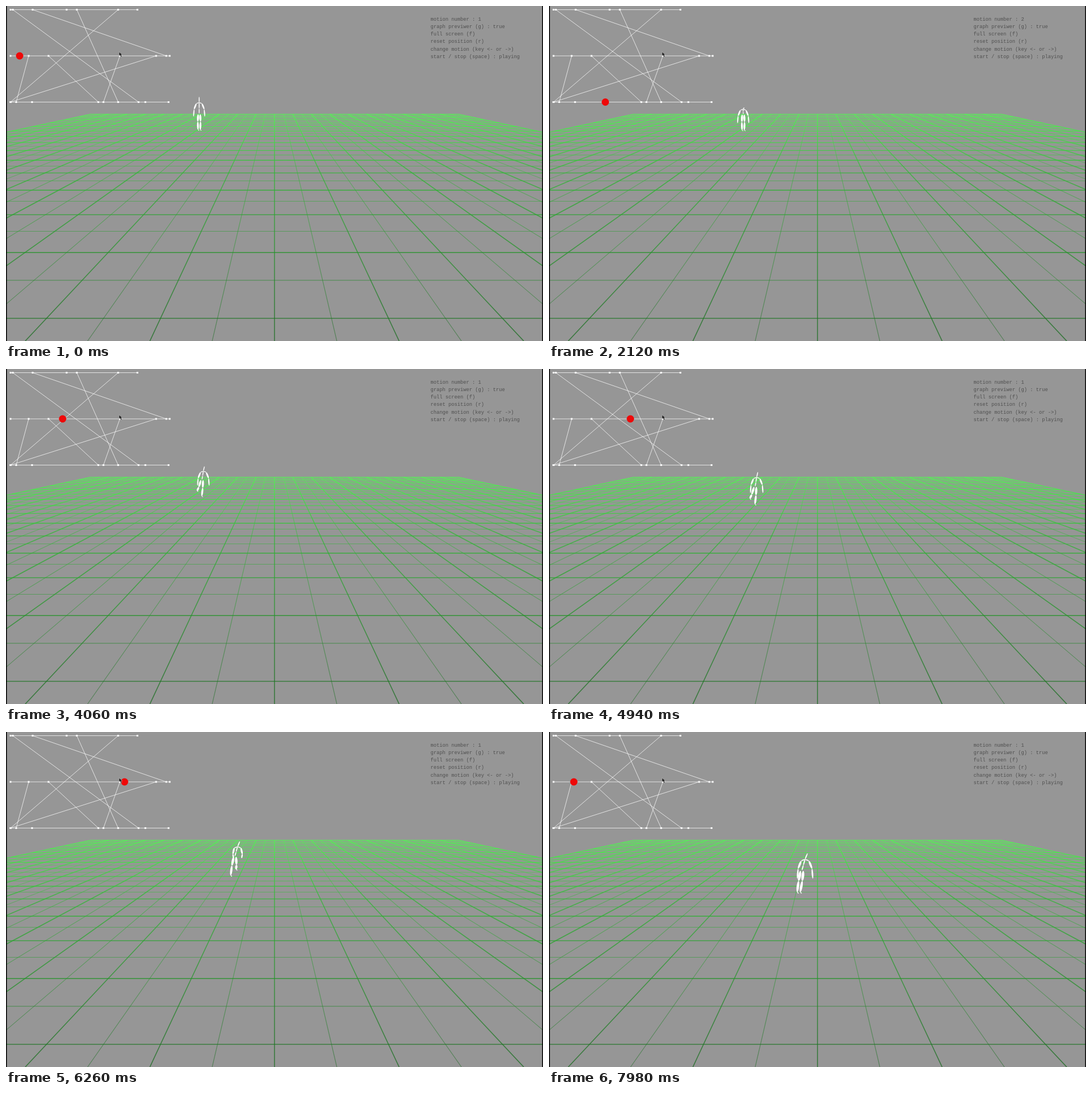
These frames come from a looping animation (948 by 591 pixels, 8 s). An HTML page with a canvas:

```html
<!DOCTYPE html>
<html lang="en">
<head>
<meta charset="utf-8">
<title>Motion graph</title>
<style>
  html, body { margin: 0; width: 100%; height: 100%; overflow: hidden; background: #969696; }
  canvas { position: absolute; left: 0; top: 0; }
  pre {
    position: absolute; left: 749.5px; top: 18px; margin: 0;
    font: 8.75px/13.15px "Liberation Mono", monospace; color: #505050;
  }
</style>
</head>
<body>
<canvas id="stage" width="948" height="591"></canvas>
<pre>motion number : <span id="number">1</span>
graph previwer (g) : true
full screen (f)
reset position (r)
change motion (key &lt;- or -&gt;)
start / stop (space) : playing</pre>
<script>
const W = 948, H = 591, LOOP = 8000;
const ctx = document.getElementById('stage').getContext('2d');
const number = document.getElementById('number');

const mix = (a, b, k) => a + (b - a) * k;
const clamp = k => Math.max(0, Math.min(1, k));
function ramp(t, from, to) {
  const k = clamp((t - from) / (to - from));
  return k * k * (3 - 2 * k);
}

function line(c, x1, y1, x2, y2) {
  c.beginPath();
  c.moveTo(x1, y1);
  c.lineTo(x2, y2);
  c.stroke();
}

// ---- static scene ----
const rowY = row => 6.5 + 81.5 * row;
// x and row of both ends
const edges = [
  [12, 0, 234, 2], [47, 0, 283, 1], [125, 0, 198, 2], [198, 0, 8, 2],
  [265, 1, 8, 2], [40, 1, 18, 2], [75, 1, 163, 2], [201, 1, 172, 2]
];
// first node, last node and unlinked nodes of each row
const rows = [[8, 232, 107], [8, 289], [8, 287, 46, 246]];

function drawFloor(c) {
  const horizon = 121.7, top = 191, centre = W / 2;
  const shade = c.createLinearGradient(0, top, 0, H);
  shade.addColorStop(0, '#50f850');
  shade.addColorStop(0.25, '#30b834');
  shade.addColorStop(1, '#186a1e');
  c.strokeStyle = shade;
  const spread = y => 0.2344 * (y - horizon);
  const weight = i => {
    c.lineWidth = i % 2 ? 1.1 : 1.6;
    c.globalAlpha = i % 2 ? 0.55 : 0.75;
  };
  for (let i = -20; i <= 20; i++) {
    weight(i);
    line(c, centre + i * spread(top), top, centre + i * spread(H), H);
  }
  for (let i = 0; i <= 28; i++) {
    const y = horizon + 1 / (0.002329 + 0.000432 * i);
    const half = 20 * spread(y);
    weight(i);
    line(c, centre - half, y, centre + half, y);
  }
  c.globalAlpha = 1;
}

function drawGraph(c) {
  c.strokeStyle = 'rgba(255,255,255,.72)';
  c.fillStyle = '#fff';
  c.lineWidth = 1;
  const node = (x, row) => c.fillRect(x - 1.5, rowY(row) - 1.5, 3, 3);
  rows.forEach((xs, row) => {
    line(c, xs[0], rowY(row), xs[1], rowY(row));
    xs.forEach(x => node(x, row));
  });
  for (const [x1, r1, x2, r2] of edges) {
    line(c, x1, rowY(r1), x2, rowY(r2));
    node(x1, r1);
    node(x2, r2);
  }
}

const scene = document.createElement('canvas');
scene.width = W;
scene.height = H;
{
  const c = scene.getContext('2d');
  c.fillStyle = '#969696';
  c.fillRect(0, 0, W, H);
  drawFloor(c);
  drawGraph(c);
  c.fillStyle = '#000';
  c.fillRect(0, 0, 1.5, H);
  c.fillRect(W - 1.5, 0, 1.5, H);
}

// ---- dot on the graph ----
const SPEED = 0.0497, CROSSING = 160;
// row, entry x, exit x
const route = [[1, 24, 40], [2, 18, 163], [1, 75, 265], [2, 8, 18], [1, 40, 60]];

function dotAt(t) {
  for (let i = 0; i < route.length; i++) {
    const [row, enter, leave] = route[i];
    const stay = (leave - enter) / SPEED;
    if (t < stay || i === route.length - 1) {
      return { x: enter + t * SPEED, y: rowY(row), motion: row };
    }
    t -= stay;
    if (t < CROSSING) {
      const [nextRow, nextX] = route[i + 1], k = t / CROSSING;
      return { x: mix(leave, nextX, k), y: mix(rowY(row), rowY(nextRow), k), motion: nextRow };
    }
    t -= CROSSING;
  }
}

function drawDot(t) {
  const { x, y, motion } = dotAt(t);
  ctx.fillStyle = '#ee0808';
  ctx.beginPath();
  ctx.arc(x, y, 6.5, 0, Math.PI * 2);
  ctx.fill();
  number.textContent = motion;
}

// ---- figure ----
const STEP_CYCLE = 880;
// time and pelvis position
const path = [[0, 341, 190], [3500, 344, 191], [4060, 346, 195], [4940, 364, 207],
  [6260, 404, 219], [LOOP, 447, 244]];

function pelvisAt(t) {
  const i = path.findIndex(p => t < p[0]);
  const [t0, x0, y0] = path[i - 1], [t1, x1, y1] = path[i];
  const k = (t - t0) / (t1 - t0);
  return [mix(x0, x1, k), mix(y0, y1, k)];
}

function bone([x1, y1], [x2, y2], width) {
  const dx = x2 - x1, dy = y2 - y1;
  ctx.beginPath();
  ctx.ellipse((x1 + x2) / 2, (y1 + y2) / 2, Math.hypot(dx, dy) / 2, width / 2,
    Math.atan2(dy, dx), 0, Math.PI * 2);
  ctx.fill();
}

function drawFigure(t) {
  const pelvis = pelvisAt(t);
  const size = 1 + (pelvis[1] - 191) / 145;
  const rise = 1 - ramp(t, 3380, 3700);
  const bow = ramp(t, 1000, 2600) * rise;
  const droop = 0.6 * ramp(t, 500, 1100) * rise;
  const walk = ramp(t, 3450, 3800) * (1 - ramp(t, 7372, 7700));
  const swing = walk * Math.cos((t - 4060) / STEP_CYCLE * Math.PI * 2);
  const lean = 0.16 * ramp(t, 3450, 4060) + 0.12 * ramp(t, 4940, 6260);
  const pitch = 1.42 * bow + 0.75 * ramp(t, 3450, 3800);

  const from = ([x, y], dx, dy) => [x + dx * size, y + dy * size];
  const reach = (p, length, roll, tilt) =>
    from(p, length * Math.sin(roll) * Math.cos(tilt), -length * Math.cos(roll) * Math.cos(tilt));
  const draw = (a, b, width) => bone(a, b, width * size);

  const neck = reach(pelvis, 20, lean, pitch);
  const head = reach(neck, 10, lean * 1.4 + droop, pitch * pitch);
  const waist = [mix(pelvis[0], neck[0], 0.45), mix(pelvis[1], neck[1], 0.45)];
  ctx.fillStyle = '#fff';
  draw(head, neck, 1.5);
  draw(neck, waist, 1.5);
  draw(waist, pelvis, 1.5);

  for (const side of [-1, 1]) {
    const lift = Math.max(0, -side * swing);
    const tuck = Math.max(0, -swing);
    const shoulder = from(neck, side * 5, 2);
    const elbow = from(neck, side * (9 - 2 * tuck), 12 - tuck);
    const hand = from(neck, side * (10 - 4 * tuck), 25 - 8 * tuck);
    draw(neck, shoulder, 1.3);
    draw(shoulder, elbow, 2.7);
    draw(elbow, hand, 2.1);

    const hip = from(pelvis, side * 1.8, 1);
    const knee = from(pelvis, side * (2.4 + 2 * lift) - lean * 7, 14 - lift);
    const foot = from(pelvis, side * (2 + 4 * lift) - lean * 15, 28.5 - 9 * lift);
    draw(hip, knee, 3.6);
    draw(knee, foot, 3.3);
    draw(foot, from(foot, 2, 1.5), 1.2);
  }
}

const cursor = new Path2D('M199.5 81V88l1.8-1.3 1.6 3.2 1.6-.8-1.4-3h2.4Z');

function drawCursor() {
  ctx.fillStyle = '#222';
  ctx.strokeStyle = 'rgba(225,225,225,.6)';
  ctx.lineWidth = 0.7;
  ctx.fill(cursor);
  ctx.stroke(cursor);
}

function frame() {
  const t = performance.now() % LOOP;
  ctx.drawImage(scene, 0, 0);
  drawFigure(t);
  drawDot(t);
  drawCursor();
  requestAnimationFrame(frame);
}
frame();
</script>
</body>
</html>
```
